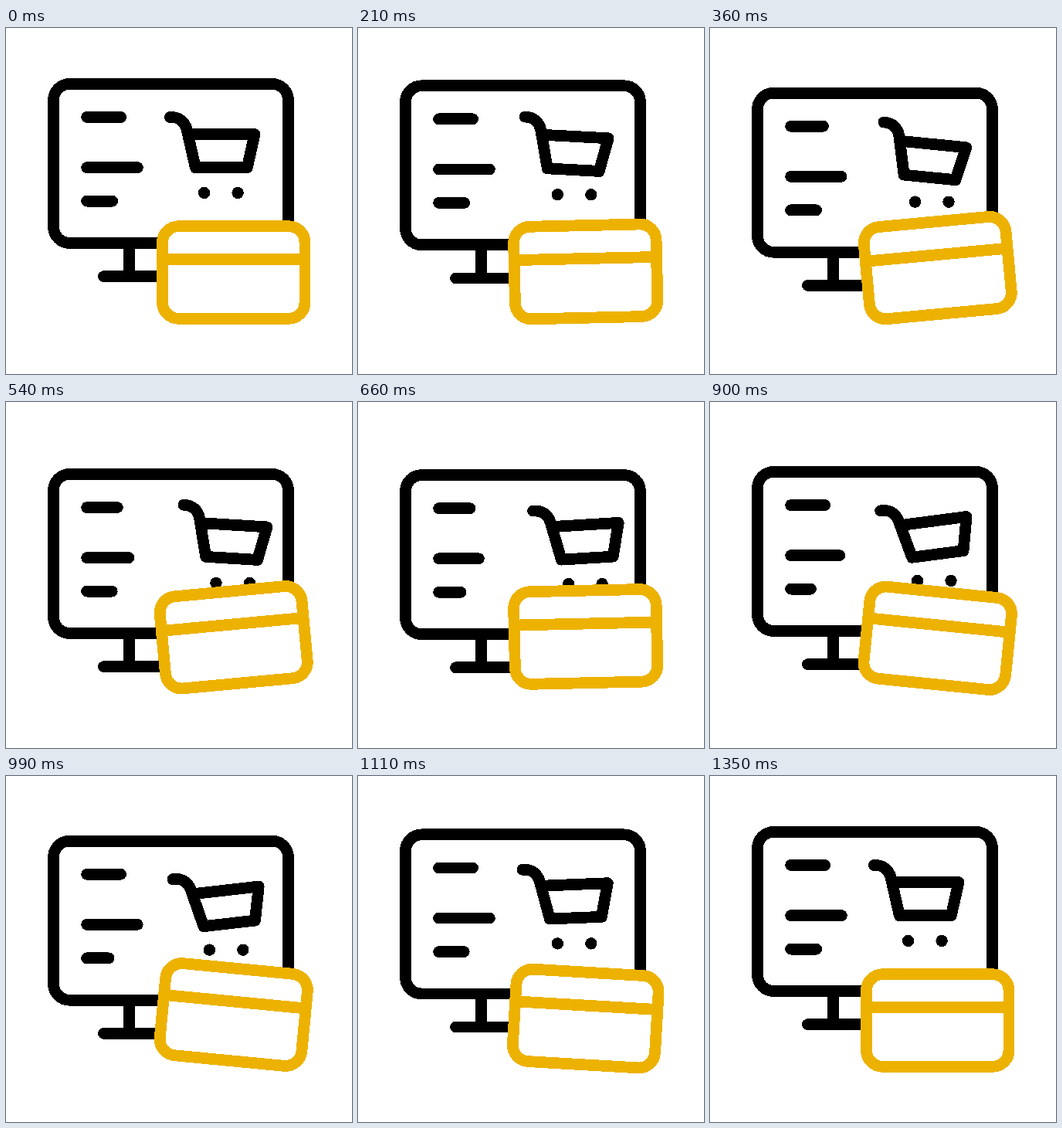
These frames come from a looping animation (448 by 448 pixels, 1.47 s). An HTML page:

```html
<!DOCTYPE html>
<html lang="en">
<head>
<meta charset="utf-8">
<title>Online checkout</title>
<style>
  html, body { margin: 0; width: 100%; height: 100%; overflow: hidden; background: #fff; }
  svg { display: block; width: 100vw; height: 100vh; shape-rendering: crispEdges; }
  .line { fill: none; stroke: #000; stroke-width: 14.8; stroke-linecap: round; stroke-linejoin: round; }
  .card { fill: #fff; stroke: #edb200; stroke-width: 14.8; }
</style>
</head>
<body>
<svg viewBox="0 0 448 448">
  <g id="screen">
    <g class="line">
      <rect x="61.5" y="72.4" width="304" height="206.1" rx="21"/>
      <path d="M159.5 278.5V321.6M126.5 321.6H210"/>
      <path id="bar0"/>
      <path id="bar1"/>
      <path id="bar2"/>
    </g>
    <g id="cart">
      <path id="basket" class="line" d="M212.5 115.5h1.5C224 115.5 231.500 121.500 234 131L245.300 180.700H312.300L322 137.500H236"/>
      <circle cx="256.6" cy="213.4" r="7.7"/>
      <circle cx="300.1" cy="213.4" r="7.7"/>
    </g>
  </g>
  <g id="card" class="card">
    <rect x="202.5" y="256.7" width="184.500" height="119.600" rx="21"/>
    <path d="M202.500 299.600H387"/>
  </g>
</svg>
<script>
const LOOP = 1470, STEP = 30, END = 1350;
const el = id => document.getElementById(id);

// cubic-bezier(.6, 0, .4, 1)
function ease(x) {
  let lo = 0, hi = 1;
  for (let i = 0; i < 24; i++) {
    const s = (lo + hi) / 2, r = 1 - s;
    if (1.8 * s * r * r + 1.2 * s * s * r + s * s * s < x) lo = s; else hi = s;
  }
  return lo * lo * (3 - 2 * lo);
}

// keys: [time, value] pairs, eased between neighbours
function track(keys, t) {
  if (t <= keys[0][0]) return keys[0][1];
  for (let i = 1; i < keys.length; i++) {
    const [t0, v0] = keys[i - 1], [t1, v1] = keys[i];
    if (t < t1) return v0 + (v1 - v0) * ease((t - t0) / (t1 - t0));
  }
  return keys[keys.length - 1][1];
}

const there = (start, peak, end, value) => [[start, 0], [peak, value], [end, 0]];

const screenY = there(30, 675, 1320, 22.2);
const cartX = there(40, 650, 1290, 16);
const cartTurn = [[30, 0], [380, 5.7], [860, -7.5], [1290, 0]];
const cardY = there(45, 690, 1340, -12.6);
const cardTurn = [[60, 0], [460, -5.75], [900, 5.75], [1350, 0]];
const bars = [
  { y: 115.5, end: 148.6, cut: there(180, 540, 900, 4.2) },
  { y: 180.6, end: 170.4, cut: there(305, 665, 1025, 14) },
  { y: 224.1, end: 137.6, cut: there(465, 825, 1185, 7.5) }
];

function draw(now) {
  const t = Math.min(END, Math.floor((now % LOOP) / STEP) * STEP);
  const set = (id, value) => el(id).setAttribute("transform", value);
  set("screen", `translate(0 ${track(screenY, t)})`);
  set("cart", `translate(${track(cartX, t)} 0)`);
  set("basket", `rotate(${track(cartTurn, t)} 267 148)`);
  set("card", `translate(0 ${track(cardY, t)}) rotate(${track(cardTurn, t)} 294.8 316.5)`);
  bars.forEach((b, i) =>
    el("bar" + i).setAttribute("d", `M104.6 ${b.y}H${b.end - track(b.cut, t)}`));
}

const start = performance.now();
function tick() {
  draw(performance.now() - start);
  requestAnimationFrame(tick);
}
tick();
</script>
</body>
</html>
```
